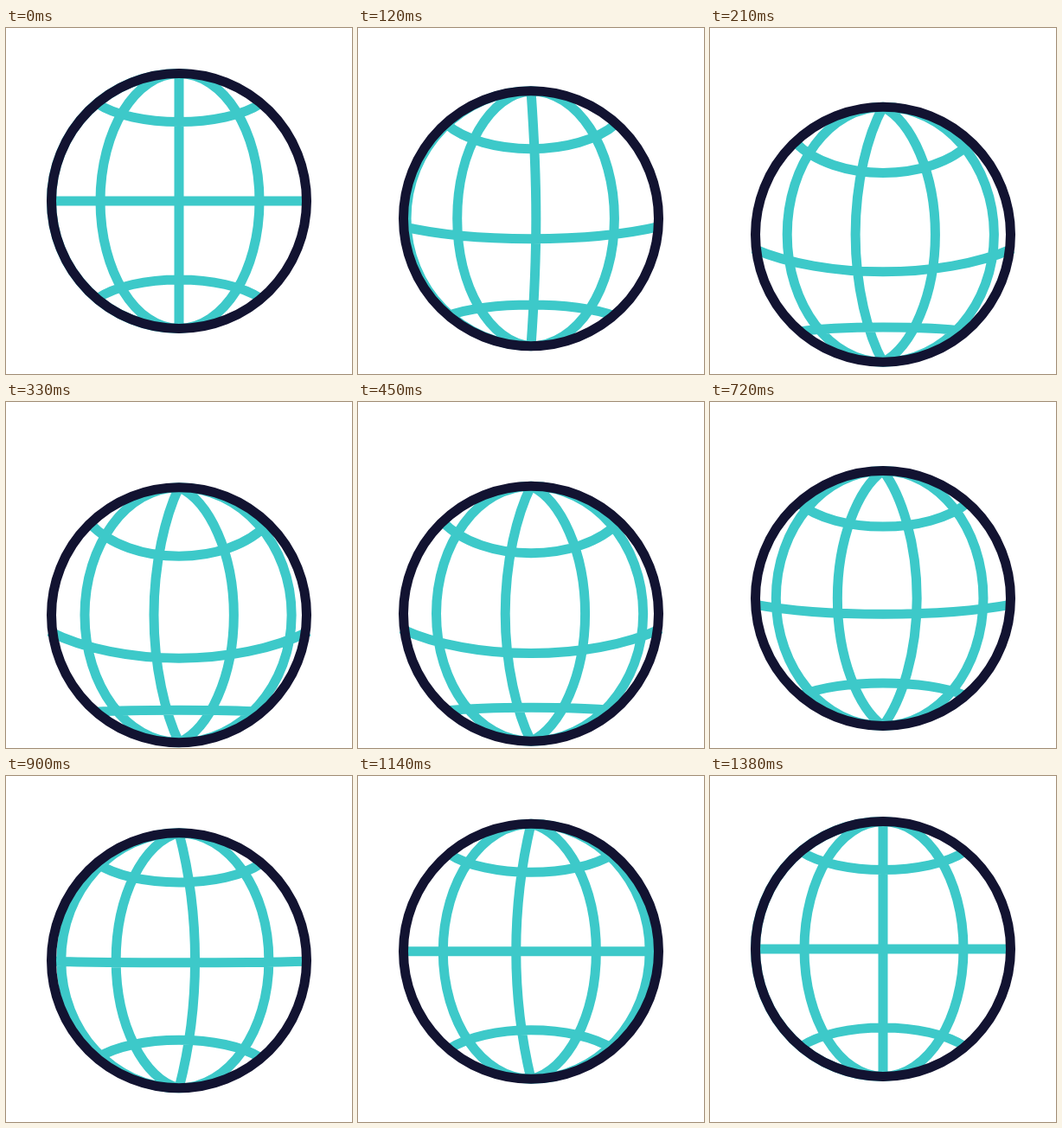
Animation, 400 px wide and 400 px high, one loop 3.41 s. Source, as an HTML page:

```html
<!DOCTYPE html>
<html lang="en">
<head>
<meta charset="utf-8">
<title>Spinning globe</title>
<style>
  html, body { margin: 0; width: 100%; height: 100%; overflow: hidden; background: #fff; }
  svg { display: block; width: 100vw; height: 100vh; }
</style>
</head>
<body>
<svg viewBox="0 0 400 400">
  <g id="globe" fill="none" stroke-width="11">
    <path id="grid" stroke="#3dc9c9"/>
    <circle r="147.5" stroke="#121331"/>
  </g>
</svg>
<script>
const LOOP = 3410, STEP = 30, REST = 1380;
const R = 147.5, K = .5523;                // K: handle length of a round arc
const TURNS = 6;                           // meridian slots passed per spin
const SLOTS = [-R, -91, 0, 93, R];         // meridian positions at rest
const globe = document.getElementById('globe');
const grid = document.getElementById('grid');

const lerp = (a, b, k) => a + (b - a) * k;

// Ease with flat ends: cubic-bezier(x1, 0, x2, 1)
function ease(x, x1, x2) {
  if (x <= 0) return 0;
  if (x >= 1) return 1;
  let lo = 0, hi = 1;
  for (let i = 0; i < 30; i++) {
    const u = (lo + hi) / 2, v = 1 - u;
    if (3 * u * v * v * x1 + 3 * u * u * v * x2 + u * u * u < x) lo = u; else hi = u;
  }
  return lo * lo * (3 - 2 * lo);
}

const span = (t, from, to, x1, x2) => ease((t - from) / (to - from), x1, x2);

// Half ellipse at the outer slots, straight line in the middle one, blended between
function meridian(i, k) {
  const a = SLOTS[i], b = SLOTS[i + 1];
  const x = lerp(a, b, k);
  const round = lerp(a ? 1 : 0, b ? 1 : 0, k);
  const pole = R * lerp(2 / 3, 1, round), mid = R * lerp(1 / 3, K, round);
  return `M0 ${-R}C${x * K} ${-pole} ${x} ${-mid} ${x} 0S${x * K} ${pole} 0 ${R}`;
}

// Symmetric arc through (0, mid) with its ends at (±x, end)
function parallel(x, end, mid, bend) {
  const cy = (4 * mid - end) / 3, cx = x * bend;
  return `M${-x} ${end}C${-cx} ${cy} ${cx} ${cy} ${x} ${end}`;
}

function draw(t) {
  const dip = span(t, 0, 345, .33, .35) - span(t, 345, REST, .33, .42);
  const tilt = span(t, 0, 335, .33, .33) - span(t, 335, 990, .33, .667);
  const spin = TURNS * span(t, 90, REST, .12, .38) % 1;

  const lines = [0, 1, 2, 3].map(i => meridian(i, spin));
  lines.push(
    parallel(lerp(95, 103, tilt), lerp(-113, -106, tilt), lerp(-91.5, -68, tilt), .55),
    parallel(150, 19 * tilt, 50 * tilt, .45),
    parallel(lerp(95, 96, tilt), lerp(113, 112, tilt), lerp(91, 110, tilt), .55)
  );
  grid.setAttribute('d', lines.join(''));
  globe.setAttribute('transform', `translate(200 ${200 + 46.3 * dip})`);
}

const start = performance.now();
function frame() {
  const t = (performance.now() - start) % LOOP;
  draw(Math.min(REST, Math.floor(t / STEP) * STEP));
  requestAnimationFrame(frame);
}
frame();
</script>
</body>
</html>
```
